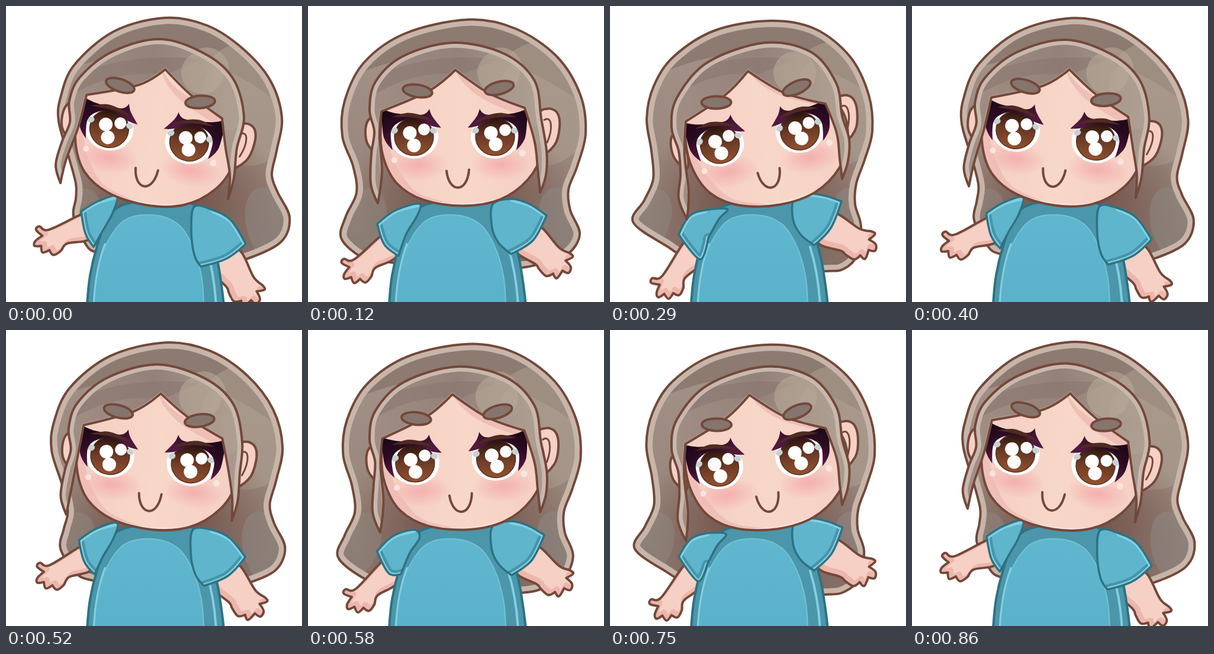
These frames come from a looping animation (500 px wide and 500 px high, 920 ms). An HTML page with a canvas:

```html
<!DOCTYPE html>
<html lang="en">
<head>
<meta charset="utf-8">
<title>Swaying girl</title>
<style>
  html, body { margin: 0; width: 100%; height: 100%; overflow: hidden; background: #fff; }
  canvas { display: block; width: 500px; height: 500px; }
</style>
</head>
<body>
<canvas id="stage" width="500" height="500"></canvas>
<script>
const ctx = document.getElementById('stage').getContext('2d');
const LOOP = 920;
const LINE = '#73483a', TEAL_LINE = '#2d7283', SKIN = '#f6d0c5';

// Sway per step: 1 = leaning right, 0 = upright, -1 = leaning left.
const SWAY = [1, .66, 0, -.85, -1.35, -1, -.1, .84, 1, .62, -.32, -1, -1.33, -.85, .1, .92];
const stepStart = i => Math.round(i * 5.75) * 10;

// "x,y" points; a trailing ! marks a sharp corner.
const parse = s => s.trim().split(/\s+/).map(p => {
  const [x, y] = p.split(',').map(parseFloat);
  return { x, y, sharp: p.endsWith('!') };
});

const mix = (u, right, mid, left) => mid + (u > 0 ? u * (right - mid) : -u * (left - mid));

function pose(right, mid, left) {
  const [r, m, l] = [right, mid, left].map(parse);
  return u => m.map((p, i) => ({
    x: mix(u, r[i].x, p.x, l[i].x),
    y: mix(u, r[i].y, p.y, l[i].y),
    sharp: p.sharp
  }));
}

function spline(pts, closed = true) {
  const path = new Path2D(), n = pts.length;
  const at = i => closed ? pts[(i + n) % n] : pts[Math.max(0, Math.min(n - 1, i))];
  const tangent = i => {
    const a = at(i - 1), b = at(i + 1), k = at(i).sharp ? 0 : 1 / 6;
    return [(b.x - a.x) * k, (b.y - a.y) * k];
  };
  path.moveTo(pts[0].x, pts[0].y);
  for (let i = 0; i < (closed ? n : n - 1); i++) {
    const p = at(i), q = at(i + 1), [px, py] = tangent(i), [qx, qy] = tangent(i + 1);
    path.bezierCurveTo(p.x + px, p.y + py, q.x - qx, q.y - qy, q.x, q.y);
  }
  if (closed) path.closePath();
  return path;
}
const shape = s => spline(parse(s));

function oval(x, y, rx, ry = rx, deg = 0) {
  const path = new Path2D();
  path.ellipse(x, y, rx, ry, deg * Math.PI / 180, 0, 2 * Math.PI);
  return path;
}

function fill(path, color) { ctx.fillStyle = color; ctx.fill(path); }
function stroke(path, color = LINE, width = 4) {
  ctx.strokeStyle = color; ctx.lineWidth = width; ctx.stroke(path);
}
function group(draw) { ctx.save(); draw(); ctx.restore(); }
function inside(path, draw) { group(() => { ctx.clip(path); draw(); }); }
function turn(x, y, deg, ox, oy) {
  ctx.translate(x, y); ctx.rotate(deg * Math.PI / 180); ctx.translate(-ox, -oy);
}
function linear(x0, y0, x1, y1, ...colors) {
  const g = ctx.createLinearGradient(x0, y0, x1, y1);
  colors.forEach((c, i) => g.addColorStop(i / (colors.length - 1), c));
  return g;
}
function glow(x, y, rx, ry, inner, outer) {
  group(() => {
    ctx.translate(x, y); ctx.scale(rx, ry);
    const g = ctx.createRadialGradient(0, 0, .1, 0, 0, 1);
    g.addColorStop(0, inner); g.addColorStop(1, outer);
    fill(oval(0, 0, 1), g);
  });
}

const backHair = pose(
  `268,20 340,33 400,72 446,125 466,188 457,245 449,285 459,315 479,357 465,398 410,426 370,432
   260,435 158,418 132,398 114,355 118,325 118,300 106,255 89,195 92,155 115,100 182,43`,
  `270,23 350,38 420,85 460,150 469,215 455,270 440,310 443,345 459,385 440,418 400,432 360,442
   260,445 130,432 90,424 56,392 64,355 82,315 76,270 58,220 62,160 95,95 165,46`,
  `270,25 345,38 405,85 437,150 443,212 430,260 416,300 414,335 424,372 418,420 395,444 362,448
   260,450 140,428 95,405 39,365 58,328 73,292 70,245 62,190 74,135 108,85 178,41`);

const frontHair = pose(
  `92,299! 84,268 95,228 108,196 107,160 125,120 180,77 262,56 340,83 385,125 402,188 390,240
   385,290 375,326! 378,285 371,240 365,190! 312,150 269,107! 225,133 136,150! 122,205 102,258`,
  `118,333! 106,300 107,250 112,212 104,175 114,128 160,85 245,62 330,80 382,125 394,190 403,245
   402,285 392,315! 388,275 383,230 366,172! 305,147 249,108! 205,143 124,178! 121,220 125,280`,
  `130,360! 116,325 119,285 116,245 104,205 113,155 165,95 262,62 340,78 382,130 392,185 404,225
   402,262 392,292! 388,258 383,215 364,165! 295,147 233,110! 195,150 128,195! 126,250 133,315`);

const leftSleeve = pose(
  '127,347! 155,330 187,321 180,350 162,382 148,407! 134,384',
  '117,368! 148,345 188,334 184,355 166,385 153,422! 129,403',
  '116,386! 134,355 160,345 198,343 184,360 166,392 152,428! 131,413');
const rightSleeve = pose(
  '405,402! 380,362 350,345 318,339 313,380 318,420 329,440! 372,427',
  '403,354! 375,335 345,326 312,335 311,375 322,400 343,419! 380,396',
  '391,330! 365,321 338,317 311,325 309,360 322,386 345,404! 373,375');

const leftArm = shape(`150,375 126,386 78,428 61,427 57,434 70,441! 61,453 62,461 73,458! 78,468
  88,461! 97,467 107,457 114,442 150,422`);
const rightArm = shape(`365,372 392,372 424,408 443,418 447,424 435,430! 444,441 440,451 430,447!
  420,460 414,452! 402,456 390,444 384,436 350,412`);

const body = shape('137,505! 142,455 154,405 172,358 200,335 260,328 312,333 338,365 355,420 363,465 368,505!');
const panel = shape('149,505! 153,455 168,405 200,362 248,353 290,368 315,405 330,455 334,505!');
const face = shape(`123,205 127,255 150,300 195,328 262,338 325,327 372,293 394,248 388,190
  320,115 250,88 180,115 135,150`);
const leftEar = shape('120,188 103,192 97,212 102,236 120,249');
const rightEar = shape('390,186 405,174 421,181 425,205 416,236 390,251');
const lid = shape(`124,174! 150,182 193,184 205,174! 210,187 225,206! 208,203 178,191 152,198
  140,214 143,244! 128,222`);
const lidBand = shape('142,188! 170,181 200,188 210,196! 180,189');
const foreheadShade = shape('249,106! 282,136 372,176! 372,190! 300,160 262,130');
const leftShade = shape('120,200! 127,255 150,300 195,328 262,338! 190,318 155,280 135,235');
const smile = new Path2D('M234 279C238 317 269 317 272 277');
const earFold = new Path2D('M399 193C411 185 415 205 404 231');

function drawBackHair(u) {
  const path = spline(backHair(u)), dx = 14 * u;
  inside(path, () => {
    fill(path, linear(0, 20, 0, 450, '#a4948a', '#9b887e', '#826b62'));
    const crown = new Path2D(`M50 130Q150 20 ${270 + dx} 24Q400 30 470 170Q360 85 ${250 + dx} 80Q150 80 50 130Z`);
    fill(crown, '#8d7a70');
    fill(oval(395 + dx, 165, 90, 105), 'rgba(178,164,150,.45)');
    fill(oval(325 + dx, 108, 38), 'rgba(190,174,158,.5)');
    glow(262 + dx, 320, 185, 150, '#6f4e46', 'rgba(111,78,70,0)');
    fill(oval(430 + dx, 370, 38, 65, -15), 'rgba(142,137,134,.5)');
    fill(oval(90 + dx * 2, 365, 38, 60, 25), 'rgba(142,137,130,.45)');
    stroke(path, '#c7b5aa', 21);
  });
  stroke(path);
}

function drawArm(path, x, y, deg, ox, oy) {
  group(() => {
    turn(x, y, deg, ox, oy);
    fill(path, SKIN);
    inside(path, () => {
      group(() => { ctx.translate(4, -5); stroke(path, 'rgba(232,170,160,.65)', 9); });
    });
    stroke(path);
  });
}

function drawSleeve(pts, hem) {
  const path = spline(pts);
  fill(path, '#5eb5cc');
  inside(path, () => {
    stroke(spline(hem, false), '#4793aa', 17);
    stroke(spline(hem, false), '#83cfe0', 8);
    stroke(spline(pts.slice(0, 3), false), '#83cfe0', 10);
  });
  stroke(path, TEAL_LINE, 3.5);
}

function drawBody(u) {
  fill(body, '#4b96aa');
  inside(body, () => {
    fill(panel, linear(0, 350, 0, 500, '#60b6ce', '#5ab2ca'));
    stroke(panel, '#70c3d7', 2);
    group(() => {
      ctx.translate(-7, 2);
      stroke(new Path2D('M345 405Q359 450 362 505'), '#83cfe0', 4);
    });
    stroke(new Path2D('M148 505Q151 445 167 402'), '#83cfe0', 3);
  });
  stroke(body, TEAL_LINE, 4);
  const l = leftSleeve(u), r = rightSleeve(u);
  drawSleeve(l, [l[5], l[6], l[0]]);
  drawSleeve(r, [r[6], r[7], r[0]]);
}

function drawEye(x, dots) {
  fill(oval(x, 221, 41, 37), '#fff');
  const iris = oval(x, 221, 33, 32);
  fill(iris, linear(0, 190, 0, 253, '#2a140e', '#6d3b25', '#925230'));
  stroke(iris, '#5a2e20', 1.5);
  for (const side of [-1, 1]) fill(oval(x + side * 33, 211, 6, 5, side * 25), '#c9d0d2');
  dots.forEach(([dx, dy, r]) => fill(oval(x + dx, dy, r), '#fff'));
}

function drawLid() {
  fill(lid, linear(130, 172, 165, 225, '#170713', '#2b0b22', '#51193f'));
  fill(lidBand, '#4e2a20');
}

function drawBrow(x, y, deg) {
  const path = oval(x, y, 25, 10.5, deg);
  fill(path, '#85756d');
  stroke(path);
}

function inHead(u, draw) {
  group(() => {
    turn(247.5 - 5.7 * u, 221.5 - 2 * u, 9.6 * u, 247.5, 222);
    draw();
  });
}

function drawFace(u) {
  fill(leftEar, SKIN);
  stroke(leftEar);
  group(() => {
    ctx.translate(8 * Math.min(u, 0), 0);
    fill(rightEar, SKIN);
    stroke(rightEar);
    stroke(earFold, LINE, 3);
  });
  fill(face, linear(125, 0, 395, 0, '#f5cec4', '#f7d7c8', '#f5cfc4'));
  inside(face, () => {
    fill(leftShade, '#efc0b7');
    fill(foreheadShade, '#edbfb7');
    stroke(new Path2D('M190 330Q262 346 330 327'), '#f9e2dd', 7);
    glow(186, 269, 52, 27, '#f4b3b0', 'rgba(244,179,176,0)');
    glow(326, 268, 52, 27, '#f4b3b0', 'rgba(244,179,176,0)');
  });
  stroke(face);
  fill(oval(146, 261, 5), '#fbe4df');
  fill(oval(362, 249, 5.5), '#fbe4df');
  drawEye(179, [[-7, 215, 11.5], [17, 209, 10], [0, 236, 11.5]]);
  drawEye(316, [[-7, 215, 11.5], [17, 210, 10], [1, 234, 11.5]]);
  drawLid();
  group(() => { ctx.translate(495, 0); ctx.scale(-1, 1); drawLid(); });
  stroke(smile);
}

function drawFrontHair(u) {
  const pts = frontHair(u), path = spline(pts), dx = 10 * u;
  inside(path, () => {
    fill(path, linear(110, 0, 390, 0, '#a08e84', '#94827a', '#a99a8d'));
    fill(new Path2D(`M90 130Q190 75 ${320 + dx} 90L${260 + dx} 116Q170 105 90 165Z`), 'rgba(137,118,109,.55)');
    fill(oval(322 + dx, 113, 36), 'rgba(184,168,152,.6)');
    fill(oval(365 + dx, 150, 42, 60), 'rgba(184,170,156,.3)');
    stroke(spline(pts.slice(0, 14), false), '#c9b8ad', 17);
    stroke(spline(pts.slice(13), false), '#b6a398', 6);
  });
  stroke(path);
}

function draw(u) {
  ctx.fillStyle = '#fff';
  ctx.fillRect(0, 0, 500, 500);
  ctx.lineJoin = ctx.lineCap = 'round';
  drawBackHair(u);
  drawArm(leftArm, 140, mix(u, 368, 400, 412), 16 * u, 140, 400);
  drawArm(rightArm, mix(u, 372, 372, 367), mix(u, 430, 393, 375), 15 * u, 372, 393);
  drawBody(u);
  inHead(u, () => drawFace(u));
  drawFrontHair(u);
  inHead(u, () => {
    drawBrow(185, 144 + mix(u, 2, 0, 6), 9);
    drawBrow(323, 139 + mix(u, 12, 0, 9), -14);
  });
}

const origin = performance.now();
function tick() {
  const t = (performance.now() - origin) % LOOP;
  let i = SWAY.length - 1;
  while (stepStart(i) > t) i--;
  draw(SWAY[i]);
  requestAnimationFrame(tick);
}
tick();
</script>
</body>
</html>
```
